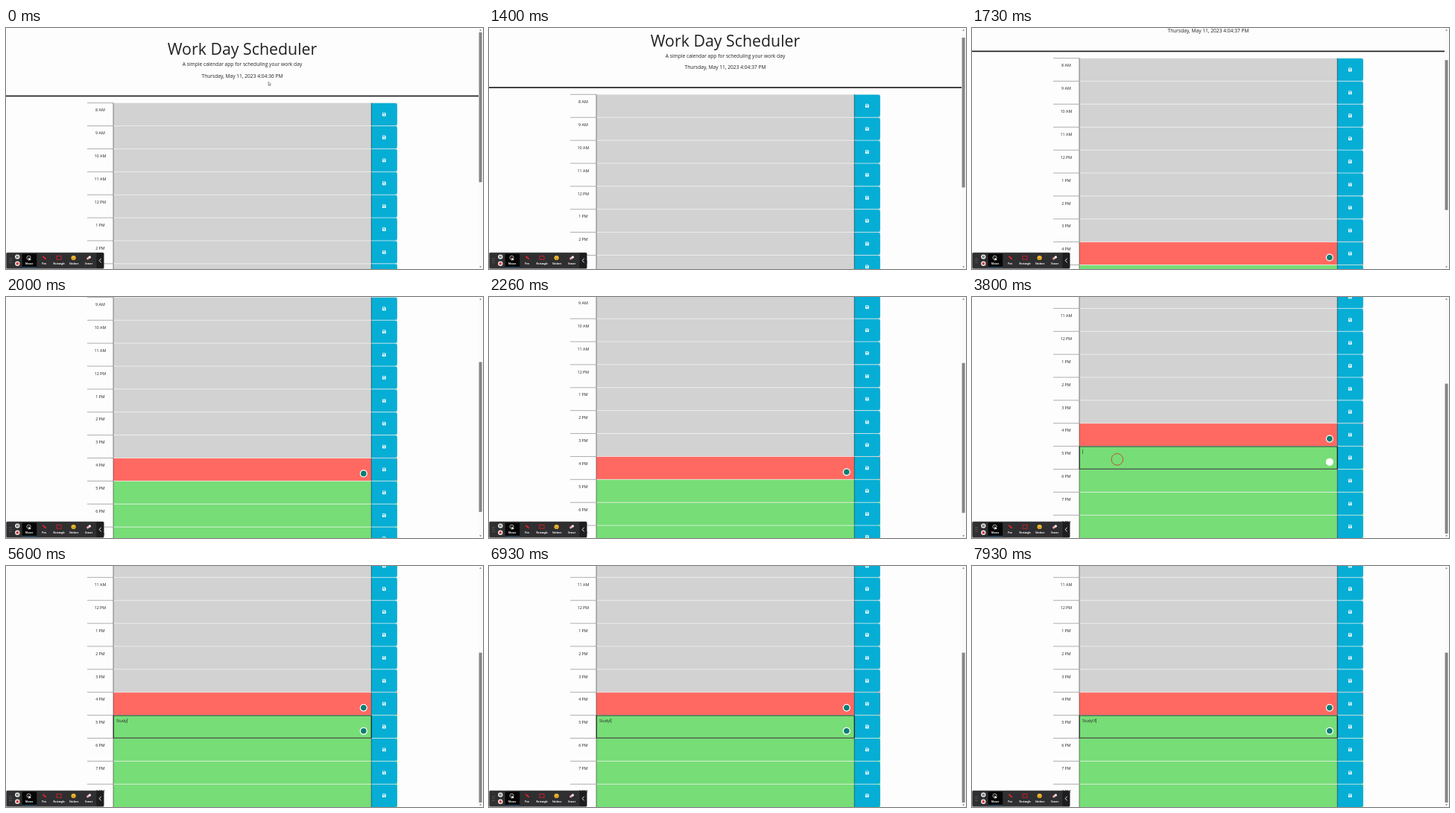
An HTML page for the animation above (8000 ms loop, 640 px wide and 324 px high).

```html
<!DOCTYPE html>
<html lang="en">
<head>
<meta charset="utf-8">
<title>Work Day Scheduler</title>
<style>
  html, body { margin: 0; width: 100%; height: 100%; overflow: hidden; background: #fdfdfd; }
  svg { display: block; width: 100vw; height: 100vh; font-family: "Open Sans", sans-serif; fill: #222; }
  .mid { text-anchor: middle; }
  .label { font-size: 5.33px; }
  .tool { font-size: 3.1px; font-weight: 700; fill: #fff; text-anchor: middle; }
</style>
</head>
<body>
<svg viewBox="0 0 640 324">
  <defs>
    <g id="save">
      <path d="M-2.3-1.9q0-.5.5-.5H1.3L2.3-1.4V1.9q0 .5-.5.5H-1.8q-.5 0-.5-.5Z" fill="#fff"/>
      <path d="M-1.6-1.7H1V-.4H-1.6Z" fill="#06aed5"/>
      <circle cy="1" r=".75" fill="#06aed5"/>
    </g>
    <g id="badge">
      <circle r="5.1" fill="#fff"/>
      <circle class="fill" r="3.8" fill="#0c7d72"/>
    </g>
  </defs>

  <g id="page">
    <g class="mid">
      <text x="317" y="36.3" font-size="21.33">Work Day Scheduler</text>
      <text x="317" y="51.2" font-size="6.67">A simple calendar app for scheduling your work day</text>
      <text id="clock" x="317" y="66.6" font-size="6.67"></text>
    </g>
    <rect y="90.6" width="634" height="1.7"/>
    <g id="rows"></g>
    <use href="#badge" x="479.8" y="368.6"/>
    <g id="editor">
      <rect x="144.2" y="379" width="346" height="30.2" fill="none" stroke="#111" stroke-width=".9"/>
      <g transform="translate(479.8 399.8)">
        <circle r="5.1" fill="#fff"/>
        <circle id="badgeFill" fill="#0c7d72"/>
      </g>
    </g>
    <text id="note" class="label" x="148" y="388"></text>
    <rect id="caret" y="382.8" width=".5" height="6.4"/>
  </g>

  <circle id="ripple" cx="194.8" cy="218.3" fill="none" stroke="#c8402c" stroke-width=".9"/>
  <path id="pointer" d="M0 0V4.8L1.1 3.8 1.8 5.4 2.6 5 1.9 3.5H3.4Z" fill="#fff" stroke="#222" stroke-width=".45"/>

  <g id="scrollbar">
    <rect x="634" width="6" height="324" fill="#fafafa"/>
    <path d="M635.2 3.6L636.6 2 638 3.6ZM635.2 320.4L636.6 322 638 320.4Z" fill="#555"/>
    <rect id="thumb" x="634.6" width="4" height="201.5" fill="#858585"/>
  </g>

  <g id="toolbar">
    <rect x=".3" y="302" width="131" height="21.4" rx="1.5" fill="#2f2f31" stroke="#777" stroke-width=".5"/>
    <rect x="121.3" y="302.4" width="9.8" height="20.6" rx="1.2" fill="#1d1d1f"/>
    <path d="M127.6 309.8L125.2 312.6 127.6 315.4" fill="none" stroke="#fff" stroke-width=".9"/>
    <path d="M5 309.5V316M7 309.5V316" stroke="#888" stroke-width=".9" stroke-dasharray=".9 1.8"/>
    <circle cx="15.3" cy="307.6" r="3.2" fill="#e4e4e4"/>
    <path d="M14.5 306.2V309M16.1 306.2V309" stroke="#222" stroke-width=".8"/>
    <circle cx="15.3" cy="316.8" r="3.2" fill="#e4e4e4"/>
    <rect x="13.8" y="315.3" width="3" height="3" rx=".6" fill="#e02b2b"/>
    <rect x="21.6" y="303.6" width="19.6" height="18.2" rx="1" fill="#050505"/>
    <path d="M21.8 321.6H41" stroke="#2d7fb5" stroke-width=".6"/>
    <circle cx="30.5" cy="308.8" r="2.6" fill="none" stroke="#e6d7d3" stroke-width=".8"/>
    <path d="M30.4 308.2V313L31.6 312 33.8 312Z" fill="#fff"/>
    <path d="M48.8 307.4L50 306.2 53.6 309.6 54 311.4 52.3 311Z" fill="#e5232d"/>
    <rect x="68" y="306.6" width="6" height="4.6" fill="none" stroke="#d3202a" stroke-width=".9"/>
    <circle cx="90.6" cy="309" r="3.1" fill="#f6bd2c"/>
    <path d="M89.4 308H89.9M91.4 308H91.9M89 309.8Q90.6 311.8 92.2 309.8" fill="none" stroke="#5b3410" stroke-width=".6"/>
    <g transform="rotate(-35 111 309)">
      <rect x="108" y="307.5" width="6" height="3" rx=".6" fill="#f3a6ad"/>
      <rect x="111.4" y="307.5" width="2.6" height="3" rx=".6" fill="#eee"/>
    </g>
  </g>
</svg>

<script>
const LOOP = 8000, STEP = 1000 / 15;
const ROW_TOP = 100.7, ROW_HEIGHT = 30.88, NOW = 8;
const $ = id => document.getElementById(id);

// Wheel notches as [time, scroll offset]
const SCROLL = [[1334, 0], [1530, 33.3], [1700, 66.4], [1733, 66.4], [2000, 131.2], [2140, 133.3],
  [2210, 133.3], [2480, 167.2], [2830, 167.2], [3060, 178]];
const POINTER_X = [[60, 352], [860, 240]];
const POINTER_Y = [[60, 72.3], [860, 140]];
const NOTE = "Study!!!";
const KEY_TIMES = [5130, 5200, 5400, 5470, 5600, 6800, 7130, 7430];
const CARET_SPANS = [[3800, 4300], [4800, 6060], [6600, 7930]];

function track(keys, t) {
  if (t <= keys[0][0]) return keys[0][1];
  for (let i = 1; i < keys.length; i++) {
    const [t0, a] = keys[i - 1], [t1, b] = keys[i];
    if (t <= t1) return a + (b - a) * (t - t0) / (t1 - t0);
  }
  return keys.at(-1)[1];
}

const show = (id, on) => $(id).setAttribute("visibility", on ? "visible" : "hidden");

function rowMarkup(i) {
  const y = ROW_TOP + i * ROW_HEIGHT, hour = i + 8;
  const color = i < NOW ? "#d2d2d2" : i === NOW ? "#ff6961" : "#77dd77";
  const label = `${hour > 12 ? hour - 12 : hour} ${hour < 12 ? "AM" : "PM"}`;
  return `<g transform="translate(0 ${y})">
    <rect x="144" width="381" height="${ROW_HEIGHT}" fill="${color}"/>
    <path d="M490 0H521.2Q524.8 0 524.8 3.6V27.2Q524.8 30.8 521.2 30.8H490Z" fill="#06aed5"/>
    <path d="M144 0H524" stroke="#f4f4f4" stroke-width=".7"/>
    <path d="M109 0H144" stroke="#777" stroke-width=".6"/>
    <path d="M144 0V${ROW_HEIGHT}M490.2 0V${ROW_HEIGHT}" stroke="#333" stroke-width=".6"/>
    <use href="#save" x="507.3" y="15.4"/>
    <text class="label mid" x="126.4" y="11.7">${label}</text>
  </g>`;
}

$("rows").innerHTML = Array.from({ length: 13 }, (_, i) => rowMarkup(i)).join("");
$("toolbar").insertAdjacentHTML("beforeend",
  ["Mouse", "Pen", "Rectangle", "Stickers", "Eraser"]
    .map((name, i) => `<text class="tool" x="${31.2 + 20 * i}" y="317.8">${name}</text>`).join(""));

function draw(time) {
  const t = Math.floor(time / STEP + 0.01) * STEP + 1;
  const scroll = track(SCROLL, t);
  $("page").setAttribute("transform", `translate(0 ${-scroll})`);
  $("thumb").setAttribute("y", 5.8 + scroll * 0.622);
  $("clock").textContent = `Thursday, May 11, 2023 4:04:${36 + Math.floor((t + 70) / 1000)} PM`;

  const x = track(POINTER_X, t), y = track(POINTER_Y, t);
  $("pointer").setAttribute("transform", `translate(${x} ${y})`);
  show("pointer", y < 98);

  show("editor", t >= 3800);
  $("badgeFill").setAttribute("r", track([[3870, 0], [4130, 3.8]], t));

  const typed = KEY_TIMES.filter(k => t >= k).length;
  $("note").textContent = NOTE.slice(0, typed);
  $("caret").setAttribute("x", 148.2 + (typed ? $("note").getComputedTextLength() : 0));
  show("caret", CARET_SPANS.some(([on, off]) => t >= on && t < off));

  show("ripple", t >= 3800 && t < 4260);
  $("ripple").setAttribute("r", track([[3800, 7.8], [4260, 10]], t));
  $("ripple").setAttribute("opacity", track([[3800, 1], [4260, 0]], t));
}

function loop() {
  draw(performance.now() % LOOP);
  requestAnimationFrame(loop);
}
loop();
</script>
</body>
</html>
```
